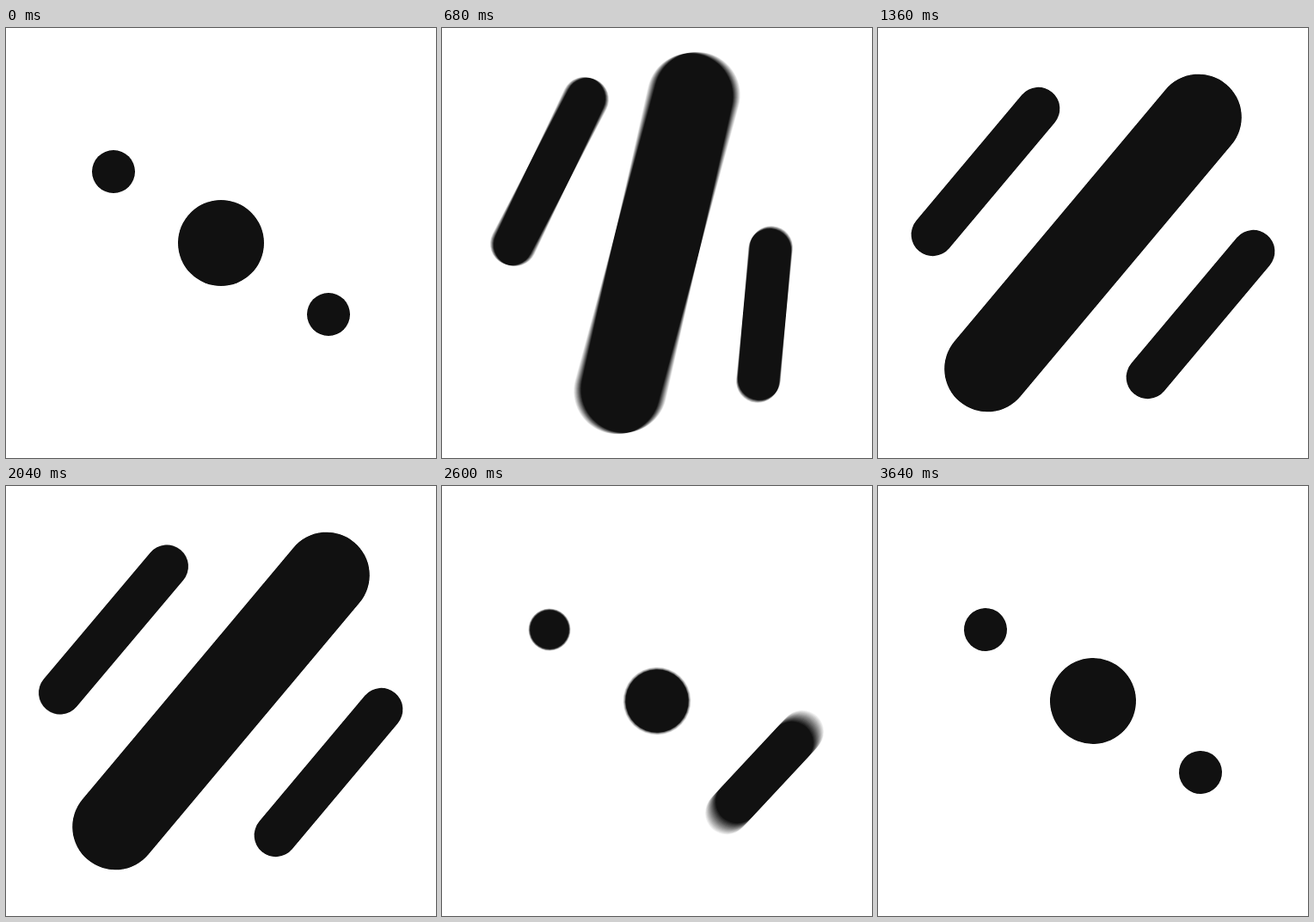
Animation of 500x500 px, one loop 3840 ms. Source, as an HTML page with a canvas:

```html
<!DOCTYPE html>
<html lang="en">
<head>
<meta charset="utf-8">
<title>Three pills</title>
<style>
  html, body { margin: 0; width: 100%; height: 100%; overflow: hidden; background: #fff; }
  canvas { display: block; }
</style>
</head>
<body>
<canvas id="stage" width="500" height="500"></canvas>
<script>
const ctx = document.getElementById('stage').getContext('2d');
const LOOP = 3840, STEP = 40, SHUTTER = 18, SAMPLES = 17;
const HALF = 95.5;      // half-length of an open pill of radius 25
const SHUT = 2485;      // moment a pill has snapped shut

// Each pill runs the same motion, one after the other
const pills = [
  { x: 125, y: 167, r: 25, delay: 0 },
  { x: 250, y: 250, r: 50, delay: 80 },
  { x: 375, y: 333, r: 25, delay: 160 }
];

const progress = (t, start, end) => Math.min(1, Math.max(0, (t - start) / (end - start)));

// Cubic Bézier easing, solved by bisection
function bezier(x1, y1, x2, y2) {
  const at = (a, b, u) => 3 * a * u * (1 - u) ** 2 + 3 * b * u * u * (1 - u) + u ** 3;
  return p => {
    if (p <= 0 || p >= 1) return p;
    let low = 0, high = 1;
    for (let i = 0; i < 20; i++) {
      const mid = (low + high) / 2;
      if (at(x1, x2, mid) < p) low = mid; else high = mid;
    }
    return at(y1, y2, low);
  };
}

const stretch = bezier(0.4, 0, 0.13, 1.2);
const tilt = bezier(0.47, 0, 0.25, 1.45);
const smooth = p => p * p * (3 - 2 * p);
const windUp = p => p ** 3 * (5.15 * p - 4.15);   // pulls back before it goes

const lengthAt = t =>
  HALF * (stretch(progress(t, 195, 960)) - windUp(progress(t, 1975, SHUT)));

const angleAt = t =>
  40 * tilt(progress(t, 350, 1190)) + 3 * smooth(progress(t, 2000, 2320));

// Damped spring of the radius after the pill has snapped shut
function swellAt(t) {
  const age = Math.max(0, t - SHUT);
  return -10.4 * Math.exp(-0.007 * age) * Math.sin(2 * Math.PI * age / 254);
}

function drawPill({ x, y, r, delay }, time) {
  const t = time - delay, scale = r / 25;
  const half = lengthAt(t) * scale + 0.01;   // a zero-length line would not be drawn
  const angle = angleAt(t) * Math.PI / 180;
  const dx = half * Math.sin(angle), dy = -half * Math.cos(angle);
  ctx.lineWidth = 2 * (r + swellAt(t) * scale);
  ctx.beginPath();
  ctx.moveTo(x - dx, y - dy);
  ctx.lineTo(x + dx, y + dy);
  ctx.stroke();
}

function render(time) {
  ctx.clearRect(0, 0, 500, 500);
  // Motion blur: add up evenly weighted samples across the shutter
  for (let i = 0; i < SAMPLES; i++) {
    const offset = (i / (SAMPLES - 1) - 0.5) * SHUTTER;
    for (const pill of pills) drawPill(pill, time + offset);
  }
}

ctx.lineCap = 'round';
ctx.strokeStyle = '#111';
ctx.globalAlpha = 1 / SAMPLES;
ctx.globalCompositeOperation = 'lighter';

const begin = performance.now();
function tick() {
  const time = (performance.now() - begin) % LOOP;
  render(Math.floor(time / STEP) * STEP);
  requestAnimationFrame(tick);
}
tick();
</script>
</body>
</html>
```
